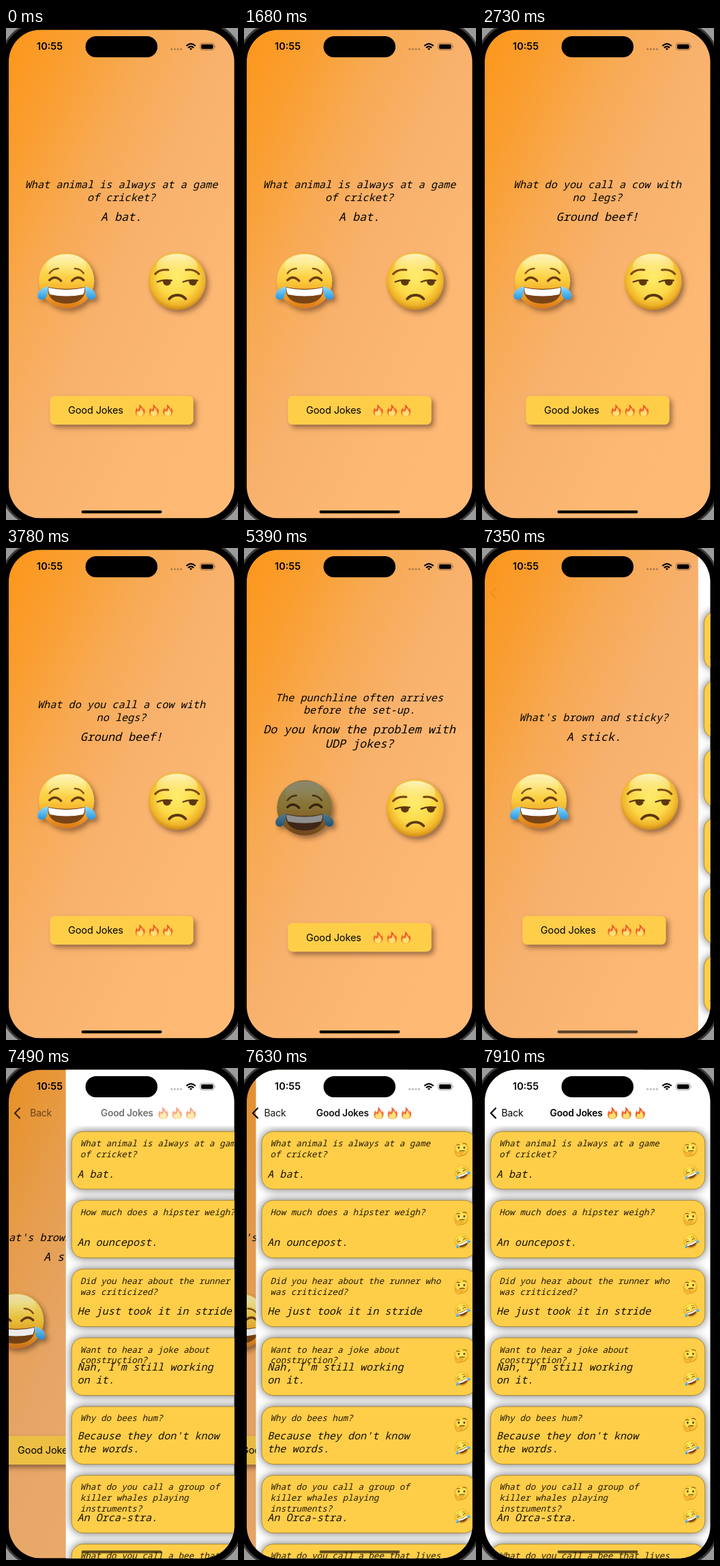
Write an HTML page that moves like this. It is 340x722 px and loops after 8 s.

```html
<!DOCTYPE html>
<html lang="en">
<head>
<meta charset="utf-8">
<title>Joke app</title>
<style>
html, body { margin: 0; width: 100%; height: 100%; overflow: hidden; background: #000; }
svg { display: block; width: 340px; height: 722px; }
.ui { font-family: Inter, Roboto, sans-serif; }
.mono { font-family: "Noto Sans Mono", "DejaVu Sans Mono", monospace; font-style: italic; }
.q { font-size: 15.2px; text-anchor: middle; }
.a { font-size: 16.75px; font-weight: 500; text-anchor: middle; }
.cq { font-size: 12.62px; fill: #221803; }
.ca { font-size: 15.1px; fill: #181002; }
</style>
</head>
<body>
<svg id="stage" viewBox="0 0 340 722" xmlns="http://www.w3.org/2000/svg">
<defs>
  <linearGradient id="sky" x1="0" y1="0" x2="1" y2="1">
    <stop offset="0" stop-color="#fd961a"/><stop offset=".15" stop-color="#fa9e30"/>
    <stop offset=".32" stop-color="#f8aa54"/><stop offset=".5" stop-color="#f8b26e"/>
    <stop offset=".75" stop-color="#fdb874"/><stop offset="1" stop-color="#feba75"/>
  </linearGradient>
  <radialGradient id="face" cx=".5" cy=".44" r=".56">
    <stop offset="0" stop-color="#ffec6a"/><stop offset=".6" stop-color="#fcd846"/>
    <stop offset=".85" stop-color="#f0b52b"/><stop offset="1" stop-color="#d08a18"/>
  </radialGradient>
  <linearGradient id="warm" x1="0" y1="0" x2="0" y2="1">
    <stop offset="0" stop-color="#f0bd3a"/><stop offset=".15" stop-color="#fde36a"/>
    <stop offset=".5" stop-color="#fbcb3c"/><stop offset=".8" stop-color="#ee9a25"/><stop offset="1" stop-color="#d9781a"/>
  </linearGradient>
  <linearGradient id="shine" x1="0" y1="0" x2="0" y2="1">
    <stop offset="0" stop-color="#fffbd8" stop-opacity=".85"/><stop offset="1" stop-color="#fff08a" stop-opacity="0"/>
  </linearGradient>
  <linearGradient id="tear" x1="0" y1="0" x2="0" y2="1">
    <stop offset="0" stop-color="#8fdcff"/><stop offset="1" stop-color="#2496e2"/>
  </linearGradient>
  <linearGradient id="flame" x1="0" y1="0" x2="0" y2="1">
    <stop offset="0" stop-color="#ee4f2c"/><stop offset=".6" stop-color="#f5682a"/><stop offset="1" stop-color="#fb9a30"/>
  </linearGradient>
  <filter id="drop" x="-30%" y="-30%" width="170%" height="170%">
    <feDropShadow dx="4" dy="4.5" stdDeviation="3.6" flood-color="#3a2408" flood-opacity=".5"/>
  </filter>
  <filter id="halo" x="-10%" y="-10%" width="120%" height="120%">
    <feDropShadow dx="0" dy="0" stdDeviation="6.5" flood-color="#000" flood-opacity=".6"/>
  </filter>
  <clipPath id="screen"><rect x="4" y="2.5" width="330.5" height="717" rx="47"/></clipPath>
  <clipPath id="below"><rect x="4" y="85" width="340" height="640"/></clipPath>

  <g id="mouth">
    <path d="M-28 9Q0 15 28 9Q28 33 0 33.500Q-28 33-28 9Z" fill="#7a4416"/>
    <path d="M-26.500 10Q0 16.500 26.500 10Q27 15 24.500 20Q0 25-24.500 20Q-27 15-26.500 10Z" fill="#fff"/>
  </g>
  <g id="happy" fill="none" stroke="#6b3d0c" stroke-linecap="round">
    <path d="M-25-1Q-17-9-8 0M8 0Q17-9 25-1" stroke-width="3.4"/>
    <path d="M-25-11Q-20-18-12-18M12-18Q20-18 25-11" stroke-width="2.4" stroke="#8a5310"/>
  </g>
  <path id="drip" d="M-27 8Q-36 11-40 15Q-44.500 21-41 26Q-35 30-30 24Q-27 18-27 8Z" fill="url(#tear)"/>
  <g id="joy">
    <circle r="40.5" fill="url(#warm)"/>
    <ellipse cy="-22" rx="29" ry="17" fill="url(#shine)"/>
    <use href="#happy"/><use href="#mouth"/>
    <use href="#drip"/><use href="#drip" transform="scale(-1 1)"/>
  </g>
  <g id="meh">
    <circle r="42" fill="url(#face)"/>
    <ellipse cy="-22" rx="30" ry="18" fill="url(#shine)"/>
    <g id="glance" fill="#5d370c">
      <path d="M-29 1Q-20-3-8-1" fill="none" stroke="#5d370c" stroke-width="2.4" stroke-linecap="round"/>
      <path d="M-21-1.500Q-15-2.500-9-1.500Q-8.500 6.500-15 6.500Q-21 6-21-1.500Z"/>
    </g>
    <use href="#glance" x="38"/>
    <path d="M-32-10.500Q-26-18-13-16.500M13-16.500Q26-18 32-10.500" fill="none" stroke="#7b4a10" stroke-width="3.200" stroke-linecap="round"/>
    <path d="M-11.500 26Q-7 20.500 .5 20.500Q8 20.500 12.500 26" fill="none" stroke="#5d370c" stroke-width="3.800" stroke-linecap="round"/>
  </g>
  <g id="hmm">
    <circle r="10.6" fill="url(#face)"/>
    <path d="M-7-5.500Q-4.500-7-2-5.500M2-7.500Q5-9 8-6.500" fill="none" stroke="#7b4a10" stroke-width="1.1"/>
    <ellipse cx="-3.800" cy="-2" rx="1.200" ry="1.600" fill="#4a2b0a"/><ellipse cx="4.200" cy="-2" rx="1.200" ry="1.600" fill="#4a2b0a"/>
    <path d="M-3 3.500Q1 1.800 5 3" fill="none" stroke="#5d370c" stroke-width="1.100"/>
    <path d="M-9 4Q-7 2.500-6 6L2 3.800Q4 4.500 2.500 5.800L-1 7Q1 11-4 11.500Q-9 11-9 4Z" fill="#f7b733" stroke="#c98222" stroke-width=".5"/>
  </g>
  <g id="rofl" transform="rotate(-24) scale(.265)">
    <circle r="40.5" fill="url(#face)"/>
    <use href="#happy"/><use href="#mouth"/>
    <use href="#drip"/><use href="#drip" transform="scale(-1 1)"/>
  </g>
  <g id="fire">
    <path d="M-1.500-9Q4-5 4-1Q5.500-2 5-4Q8 0 7 4Q5.500 9 0 9Q-6 9-7 4Q-7.500 0-5-4Q-4.500-1-3-1Q0-4-1.500-9Z" fill="url(#flame)"/>
    <path d="M.5-4Q5 1 5 4.500Q4 8.700 0 8.700Q-5 8.700-5 4Q-4.500 1.500-3 .5Q-2.500 2-1.500 2Q1 0 .5-4Z" fill="#ffdf70"/>
  </g>
  <g id="fires"><use href="#fire"/><use href="#fire" x="20.300"/><use href="#fire" x="40.600"/></g>
</defs>

<rect width="340" height="722" fill="#9b9b9b"/>
<rect x="-7" y="-8" width="352.5" height="738" rx="57" fill="#000" stroke="#3b3b3b" stroke-width="3"/>
<g clip-path="url(#screen)">
  <g id="home">
    <rect x="4" y="2.500" width="331" height="717" fill="url(#sky)"/>
    <g id="jokes"></g>
    <g id="controls">
      <g filter="url(#drop)"><g id="like"><use href="#joy" x="88.700" y="371"/></g></g>
      <g filter="url(#drop)"><use href="#meh" x="250.700" y="371.500"/></g>
      <rect x="64.500" y="540" width="210" height="42" rx="7" fill="#ffce48" filter="url(#drop)"/>
      <text class="ui" x="91" y="566.300" font-size="14.5" letter-spacing="-.1">Good Jokes</text>
      <use href="#fires" x="196.500" y="561"/>
    </g>
  </g>
  <rect id="dim" x="4" y="2" width="331" height="718" fill="#000"/>
  <g id="list">
    <rect x="4" y="2" width="345" height="718" fill="#fff"/>
    <g clip-path="url(#below)">
      <g id="cards" fill="#ffce48" stroke="#85671f" stroke-width=".7" filter="url(#halo)"></g>
      <g id="rows"></g>
    </g>
  </g>
  <g id="nav" class="ui">
    <path d="M20 59L13 66.200L20 73.400" fill="none" stroke="#000" stroke-width="2.200" stroke-linecap="round" stroke-linejoin="round"/>
    <text id="back" x="28.500" y="71.200" font-size="14" letter-spacing="-.2">Back</text>
    <g id="heading">
      <text x="99.500" y="71.200" font-size="13.8" font-weight="600" letter-spacing="-.2">Good Jokes</text>
      <use href="#fires" x="191" y="66"/>
    </g>
  </g>
  <rect id="bar" x="110.500" y="708" width="118" height="4.200" rx="2.100"/>
</g>

<rect x="116.500" y="12" width="105.500" height="31" rx="15.500"/>
<text class="ui" x="45" y="32.300" font-size="14.5" font-weight="600">10:55</text>
<g opacity=".28"><circle cx="242.700" cy="31" r="1.600"/><circle cx="247.300" cy="31" r="1.600"/><circle cx="251.900" cy="31" r="1.600"/><circle cx="256.500" cy="31" r="1.600"/></g>
<g fill="none" stroke="#000" stroke-width="2.200">
  <path d="M264.300 26.300Q271 20 277.700 26.300M266.900 29Q271 25.200 275.100 29"/>
  <path d="M269 30.400Q271 28.800 273 30.400L271 32.500Z" fill="#000" stroke="none"/>
</g>
<rect x="284.500" y="22.400" width="20.500" height="9.800" rx="3" fill="none" stroke="#000" stroke-opacity=".38"/>
<rect x="286" y="23.900" width="17.500" height="6.800" rx="1.800"/>
<path d="M306.200 25.700Q308 27.300 306.200 29Z" opacity=".45"/>
</svg>
<script>
const LOOP = 8000, STEP = 70, SLIDE = 330;
const PUSH_AT = 7328, RATE = 0.0165;

const jokes = [
  { at: 0, q: ["What animal is always at a game", "of cricket?"], a: ["A bat."] },
  { at: 1820, q: ["How does a penguin build a home?"], a: ["Igloos it together."] },
  { at: 2730, q: ["What do you call a cow with", "no legs?"], a: ["Ground beef!"] },
  { at: 3920, q: ["The punchline often arrives", "before the set-up."], a: ["Do you know the problem with", "UDP jokes?"] },
  { at: 6020, q: ["What's brown and sticky?"], a: ["A stick."] }
];

const saved = [
  [["What animal is always at a game", "of cricket?"], ["A bat."]],
  [["How much does a hipster weigh?"], ["An ouncepost."]],
  [["Did you hear about the runner who", "was criticized?"], ["He just took it in stride"]],
  [["Want to hear a joke about", "construction?"], ["Nah, I'm still working", "on it."]],
  [["Why do bees hum?"], ["Because they don't know", "the words."]],
  [["What do you call a group of", "killer whales playing", "instruments?"], ["An Orca-stra."]],
  [["What do you call a bee that lives"], []]
];

const $ = id => document.getElementById(id);

const lines = (rows, cls, x, y, gap) => rows.map((row, i) =>
  `<text class="mono ${cls}" x="${x}" y="${y + i * gap}">${row}</text>`).join("");

// A second answer line pushes the centred column apart by half its height.
const shift = joke => (joke.a.length - 1) * 10.3;

$("jokes").innerHTML = jokes.map(joke => {
  const d = shift(joke);
  return "<g>" + lines(joke.q, "q", 169, 253.5 - d - (joke.q.length - 1) * 18.6, 18.6) +
    lines(joke.a, "a", 169, 282.7 - d, 20.6) + "</g>";
}).join("");

const cardTop = i => 93.3 + i * 100.9;

$("cards").innerHTML = saved.map((_, i) =>
  `<rect x="12.5" y="${cardTop(i)}" width="314" height="84.5" rx="17"/>`).join("");

$("rows").innerHTML = saved.map(([q, a], i) => {
  const y = cardTop(i);
  return lines(q, "cq", 25, y + 21.5, 15.9) +
    lines(a, "ca", 20.7, y + 67.2 - (a.length - 1) * 18.8, 18.8) +
    `<use href="#hmm" x="305" y="${y + 25.5}"/><use href="#rofl" x="305.5" y="${y + 59.5}"/>`;
}).join("");

const groups = [...$("jokes").children];
const move = (id, x, y = 0) => $(id).setAttribute("transform", `translate(${x} ${y})`);

function render(time) {
  const t = Math.floor(time / STEP) * STEP;
  const current = jokes.findLastIndex(joke => t >= joke.at);
  groups.forEach((g, i) => g.setAttribute("display", i === current ? "inline" : "none"));
  move("controls", 0, shift(jokes[current]));
  $("like").style.filter = t >= 5390 && t < 5530 ? "brightness(.56) saturate(.8)" : "none";

  // Critically damped spring for the page push.
  const s = Math.max(0, t - PUSH_AT) * RATE;
  const left = (1 + s) * Math.exp(-s);
  const done = 1 - left;
  const x = SLIDE * left;
  move("home", -0.3 * SLIDE * done);
  move("list", x);
  move("heading", x * 0.47);
  move("back", x * 0.08);
  $("dim").setAttribute("opacity", 0.1 * done);
  $("nav").setAttribute("opacity", done);
  $("back").setAttribute("opacity", done);
  $("heading").setAttribute("opacity", done);
  $("list").setAttribute("display", done > 0 ? "inline" : "none");
  $("bar").setAttribute("opacity", done > 0 ? 0.62 : 1);
}

const start = performance.now();
function tick() {
  render((performance.now() - start) % LOOP);
  requestAnimationFrame(tick);
}
render(0);
requestAnimationFrame(tick);
</script>
</body>
</html>
```
